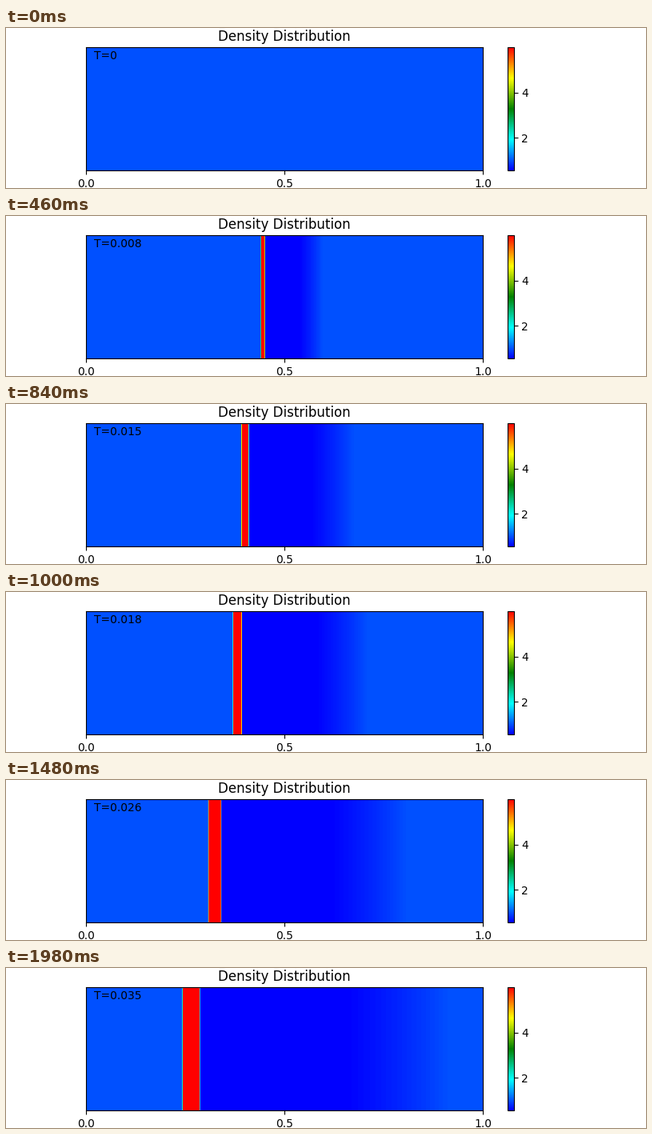
Animation of 800x200 px, one loop 2000 ms. Source, as a matplotlib script:

```python
import numpy as np
import matplotlib.pyplot as plt
from matplotlib.animation import FuncAnimation
from matplotlib.colors import LinearSegmentedColormap

# Exact Riemann solution: gas at rest, low pressure left, high pressure right
GAMMA = 1.4
P_RIGHT = 100.0
U_STAR = -6.19633
SHOCK_SPEED = -7.43747
RHO_SHOCKED, RHO_EXPANDED = 5.99242, 0.57511

T_END = 0.035
FRAMES = 100
C_RIGHT = np.sqrt(GAMMA * P_RIGHT)

x = np.linspace(0, 1, 1000)


def density(t):
    rho = np.ones_like(x)
    if t == 0:
        return rho
    s = (x - 0.5) / t
    g = GAMMA + 1
    fan = (2 / g + (GAMMA - 1) / (g * C_RIGHT) * s).clip(0, 1)
    expanded = np.maximum(fan ** (2 / (GAMMA - 1)), RHO_EXPANDED)
    rho[s > SHOCK_SPEED] = RHO_SHOCKED
    behind = s > U_STAR
    rho[behind] = expanded[behind]
    return rho


cmap = LinearSegmentedColormap.from_list(
    "density", ["blue", "cyan", "green", "yellow", "red"])

fig, ax = plt.subplots(figsize=(8, 2), dpi=100)
image = ax.imshow(density(0)[None, :], cmap=cmap, aspect="auto",
                  extent=(0, 1, 0, 1), vmin=RHO_EXPANDED, vmax=RHO_SHOCKED)
ax.set_title("Density Distribution")
ax.set_xticks([0, 0.5, 1])
ax.set_yticks([])
label = ax.text(0.02, 0.9, "T=0", transform=ax.transAxes)
fig.colorbar(image, ax=ax)


def update(i):
    t = T_END * i / FRAMES
    image.set_data(density(t)[None, :])
    label.set_text(f"T={t:.2g}")
    return image, label


anim = FuncAnimation(fig, update, frames=FRAMES, interval=20, repeat=True)
plt.show()
```
